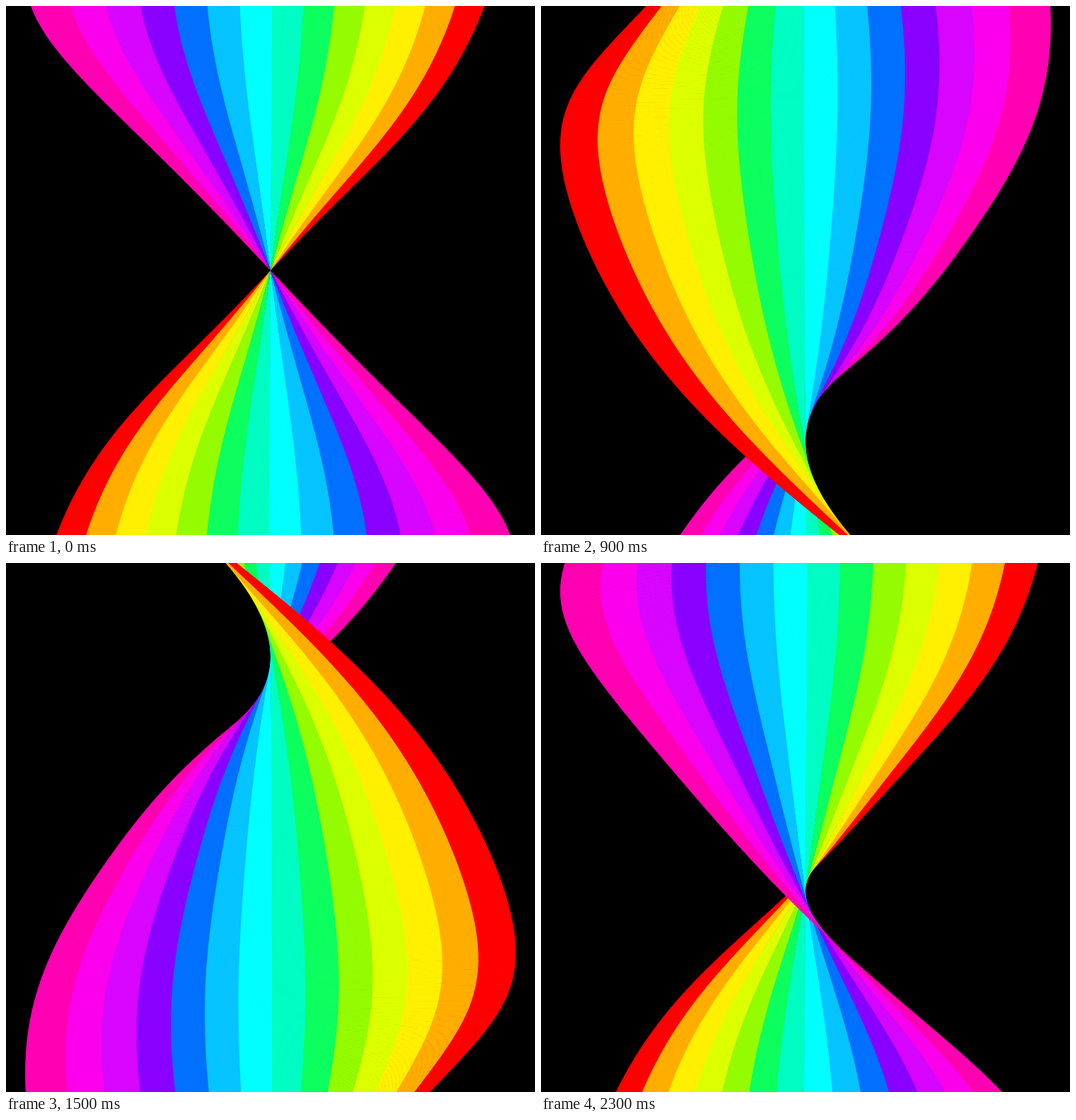
Write an HTML page with a canvas that moves like this. It is 748x748 px and loops after 2400 ms.

```html
<!DOCTYPE html>
<html lang="en">
<head>
<meta charset="utf-8">
<title>Twisting rainbow ribbon</title>
<style>
  html, body { margin: 0; width: 100%; height: 100%; overflow: hidden; background: #000; }
  canvas { display: block; }
</style>
</head>
<body>
<canvas id="stage" width="748" height="748"></canvas>
<script>
const ctx = document.getElementById('stage').getContext('2d');
const SIZE = 748, MID = SIZE / 2;
const STEPS = 24, STEP_MS = 100;
const HALF_WIDTH = 333;   // ribbon half width, unscaled by perspective
const DEPTH = 0.28;       // half width relative to camera distance
const QUARTER = 483;      // height of a quarter turn
const ROW = 3, OVERLAP = 0.8, TUCK = 0.004;

const colors = ['#ff0000', '#ffae00', '#ffef00', '#dcff00', '#95fb00', '#0cff5e', '#00fcc3',
                '#00ffff', '#05c4ff', '#0070ff', '#8a00ff', '#d805ff', '#fb00ec', '#ff00b2'];
const LAST = colors.length - 1;

// Band borders across the ribbon, from 1 (red) to -1 (pink)
const borders = colors.map((_, i) => i ? 0.857 - 0.1419 * (i - 1) : 1).concat(-1);

// Twist angle at height y, in radians; slightly slower around each quarter turn
function twist(y) {
  const u = y / QUARTER;
  return u * Math.PI / 2 - 0.0323 * Math.sin(2 * Math.PI * u);
}

function section(y, turn) {
  const a = twist(y) + turn;
  return { y, sin: Math.sin(a), cos: Math.cos(a) };
}

function point(s, sec) {
  const zoom = 1 / (1 + DEPTH * s * sec.cos);
  return [MID - s * HALF_WIDTH * sec.sin * zoom, MID + sec.y * zoom];
}

function quad(a, b, top, bottom) {
  ctx.beginPath();
  ctx.moveTo(...point(a, top));
  ctx.lineTo(...point(b, top));
  ctx.lineTo(...point(b, bottom));
  ctx.lineTo(...point(a, bottom));
  ctx.fill();
}

function draw(step) {
  const turn = step * 2 * Math.PI / STEPS;
  const rows = [];
  for (let y = -495; y < 495; y += ROW) {
    rows.push([section(y, turn), section(y + ROW + OVERLAP, turn)]);
  }
  ctx.fillStyle = '#000';
  ctx.fillRect(0, 0, SIZE, SIZE);

  // Far bands first; each is tucked a little under its nearer neighbour
  for (let k = 0; k <= LAST; k++) {
    const tuck = k < LAST ? TUCK : 0;
    for (const [top, bottom] of rows) {
      const pinkNear = top.cos > 0;
      const i = pinkNear ? k : LAST - k;
      ctx.fillStyle = colors[i];
      quad(borders[i] + (pinkNear ? 0 : tuck),
           borders[i + 1] - (pinkNear ? tuck : 0), top, bottom);
    }
  }
}

const start = performance.now();
let shown = -1;

function tick() {
  const step = Math.floor((performance.now() - start) / STEP_MS) % STEPS;
  if (step !== shown) draw(shown = step);
  requestAnimationFrame(tick);
}
tick();
</script>
</body>
</html>
```
